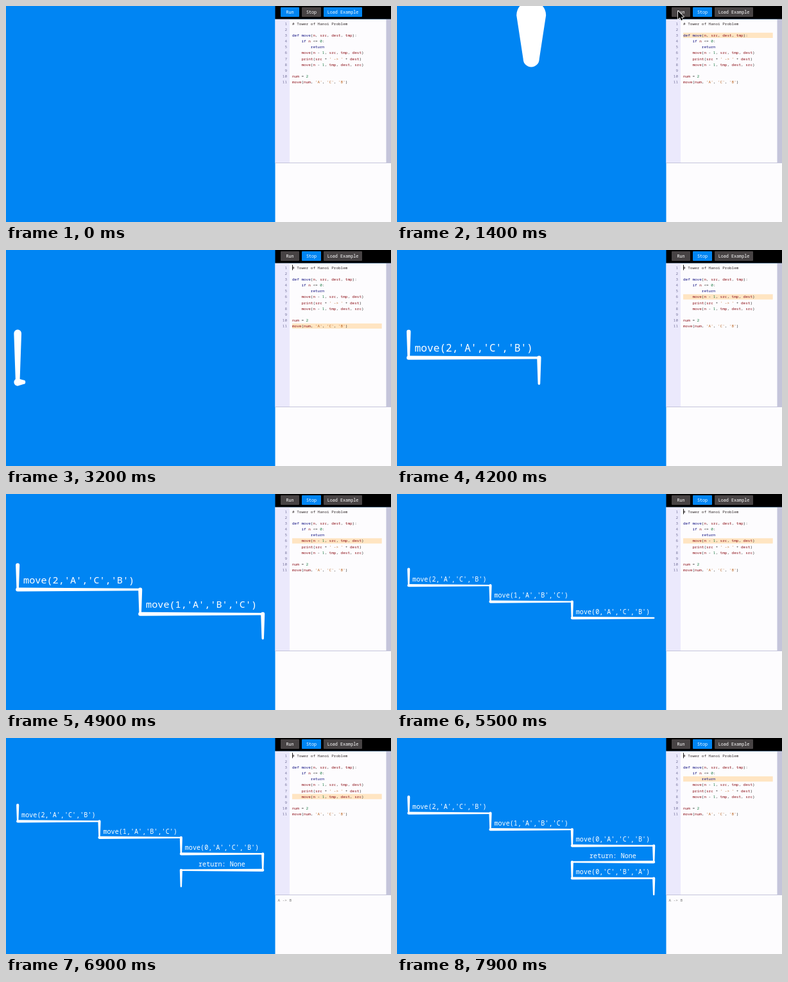
These frames come from a looping animation (600 px wide and 338 px high, 8 s). An HTML page with a canvas:

```html
<!DOCTYPE html>
<html lang="en">
<head>
<meta charset="utf-8">
<title>Call tree of a recursive program</title>
<style>
html, body { margin: 0; width: 100%; height: 100%; overflow: hidden; background: #0085f3; }
canvas { display: block; width: 600px; height: 338px; }
</style>
</head>
<body>
<canvas id="stage"></canvas>
<script>
const LOOP = 8000;
const BLUE = '#0085f3', GREY = '#474344', PAPER = '#fdfcfe', EDGE = '#c4c4da';
const FONT = '"Noto Sans Mono", "DejaVu Sans Mono", monospace';

const canvas = document.getElementById('stage');
const ctx = canvas.getContext('2d');
const dpr = window.devicePixelRatio || 1;
canvas.width = 600 * dpr;
canvas.height = 338 * dpr;
ctx.scale(dpr, dpr);

const code = `# Tower of Hanoi Problem

def move(n, src, dest, tmp):
    if n <= 0:
        return
    move(n - 1, src, tmp, dest)
    print(src + ' -> ' + dest)
    move(n - 1, tmp, dest, src)

num = 2
move(num, 'A', 'C', 'B')`.split('\n');

// Runs the program shown: each visit has its label, direction and the lines lit on arrival and after
function* trace(n, src, dest, tmp) {
  yield { text: `move(${n},'${src}','${dest}','${tmp}')`, turn: 1, enter: 4, leave: n ? 6 : 5 };
  if (n > 0) {
    yield* trace(n - 1, src, tmp, dest);
    yield* trace(n - 1, tmp, dest, src);
  }
  yield { text: 'return: None', turn: -1, enter: 7, leave: 8, output: `${src} -> ${tmp}` };
}

// Every visit draws a labelled line sideways, then a drop, in an even rhythm
const FIRST_VISIT = 3195, PERIOD = 1018;
const ACROSS = 260, DROP_AT = 460, DROP = 150, ZOOM = 100;

const lit = [[0, 0], [1250, 3], [2250, 10], [2780, 11]];
const branches = [{ c1: 0, r1: 0, c2: 0, r2: 1, start: 1230, end: 2000 }];
const columnZooms = [], rowZooms = [];
let output = '', outputAt = LOOP;

let col = 0, row = 1, start = FIRST_VISIT;
for (const visit of trace(2, 'A', 'C', 'B')) {
  if (start > LOOP) break;
  const next = col + visit.turn;
  const dropStart = start + DROP_AT, dropEnd = dropStart + DROP;
  branches.push({ c1: col, r1: row, c2: next, r2: row, start, end: start + ACROSS, text: visit.text });
  branches.push({ c1: next, r1: row, c2: next, r2: row + 1, start: dropStart, end: dropEnd });
  if (next > columnZooms.length) columnZooms.push(start - ZOOM);
  rowZooms.push(start + ACROSS - ZOOM);
  lit.push([dropStart, visit.enter], [dropEnd, visit.leave]);
  if (visit.output && !output) {
    output = 'A -> B';
    outputAt = dropEnd;
  }
  col = next;
  row++;
  start += PERIOD;
}

const ramp = (t, a, b) => Math.min(1, Math.max(0, (t - a) / (b - a)));
const ease = p => p * p * (3 - 2 * p);
const mix = (a, b, p) => a + (b - a) * p;
const zoomed = (t, zooms) => zooms.reduce((sum, at) => sum + ramp(t, at, at + ZOOM), 0);

function box(x, y, w, h, color, radius = 0) {
  ctx.fillStyle = color;
  ctx.beginPath();
  ctx.roundRect(x, y, w, h, radius);
  ctx.fill();
}

function label(text, x, y, size, color, align = 'left', weight = 400) {
  ctx.font = `${weight} ${size}px ${FONT}`;
  ctx.textAlign = align;
  ctx.fillStyle = color;
  ctx.fillText(text, x, y);
}

// Round-ended stroke whose width tapers from radius r1 to r2
function taper(x1, y1, x2, y2, r1, r2) {
  const angle = Math.atan2(y2 - y1, x2 - x1);
  ctx.fillStyle = '#fff';
  ctx.beginPath();
  ctx.arc(x1, y1, r1, angle + Math.PI / 2, angle - Math.PI / 2);
  ctx.arc(x2, y2, r2, angle - Math.PI / 2, angle + Math.PI / 2);
  ctx.fill();
}

function drawTree(t) {
  const cols = zoomed(t, columnZooms);
  const rows = 1 + zoomed(t, rowZooms);
  const unit = Math.min(308 / rows, 76.4 / Math.max(cols, 0.01));
  const left = 209.2 - cols * unit * 2.5;
  const top = 168.6 - rows * unit / 2;
  const px = c => left + c * unit * 5;
  const py = r => top + r * unit;

  for (const { c1, r1, c2, r2, start, end, text } of branches) {
    if (t < start) break;
    const p = ramp(t, start, end);
    taper(px(c1), py(r1), px(mix(c1, c2, p)), py(mix(r1, r2, p)), unit * 0.074 + 0.2, unit * 0.04 + 0.2);
    if (!text) continue;
    const size = unit * 0.398;
    const x = px((c1 + c2) / 2) - text.length * size * 0.3;
    label(text.slice(0, Math.floor(p * text.length)), x, py(r1) - unit * 0.245, size, '#fff', 'left', 300);
  }
}

function tokenColor(token) {
  if (token[0] === '#') return '#332b2b';
  if (token[0] === "'") return '#b8601c';
  if (/^\d/.test(token)) return '#1c7a44';
  if (/^(def|if|return)$/.test(token)) return '#101080';
  return /^\w/.test(token) ? '#8c1018' : '#333';
}

function drawEditor(t) {
  box(419.5, 20.5, 180.5, 317.5, PAPER);
  box(419.5, 20.5, 22.5, 225, '#ebe9fc');
  box(592.5, 20.5, 7.5, 225, EDGE);
  box(419.5, 245, 180.5, 1, EDGE);

  const lineY = n => 27.6 + (n - 1) * 9.14;
  const current = lit.filter(([time]) => time <= t).pop()[1];
  if (current) box(446, lineY(current) - 4.1, 139.7, 8.2, '#ffe5c2');

  code.forEach((line, i) => {
    const y = lineY(i + 1) + 2.1;
    label(i + 1, 438, y, 6, '#77749c', 'right');
    for (const match of line.matchAll(/#.*|'[^']*'|\w+|[^\s\w']+/g)) {
      const token = match[0];
      const defined = line.startsWith('def') && token === 'move';
      label(token, 446 + match.index * 3.6, y, 6, defined ? '#101080' : tokenColor(token), 'left', 500);
    }
  });

  const blink = t > 3000 && (t - 880) % 1100 < 550;
  if (blink || (t > 1750 && t < 2280)) box(446, 23.2, 0.9, 8.4, '#000');
  if (t >= outputAt) label(output, 423.5, 256, 6, '#777');
}

function drawToolbar(t) {
  const running = t >= 1000;
  box(419.5, 0, 180.5, 20.5, '#000');
  for (const [text, x, w, active] of [
    ['Run', 428, 29, !running],
    ['Stop', 461, 30, running],
    ['Load Example', 495, 60, !running]
  ]) {
    box(x, 2, w, 15, active ? BLUE : GREY, 1);
    label(text, x + w / 2, 11.8, 6.75, '#fff', 'center');
  }
}

function drawPointer(t) {
  if (t < 80 || t > 3040) return;
  const enter = ease(ramp(t, 80, 900));
  const leave = ease(ramp(t, 2740, 3040));
  ctx.save();
  ctx.translate(mix(mix(578, 438, enter), 584, leave), mix(mix(105, 8, enter), 60, leave));
  const arrow = new Path2D('M0 0V12.6L2.9 9.9L5 14.6L7.1 13.7L5.1 9.1L9 9Z');
  ctx.lineWidth = 1.6;
  ctx.lineJoin = 'round';
  ctx.strokeStyle = '#fff';
  ctx.stroke(arrow);
  ctx.fillStyle = '#000';
  ctx.fill(arrow);
  ctx.restore();
}

const began = performance.now();

function frame() {
  const t = (performance.now() - began) % LOOP;
  box(0, 0, 600, 338, BLUE);
  drawTree(t);
  drawEditor(t);
  drawToolbar(t);
  drawPointer(t);
  requestAnimationFrame(frame);
}
frame();
</script>
</body>
</html>
```
